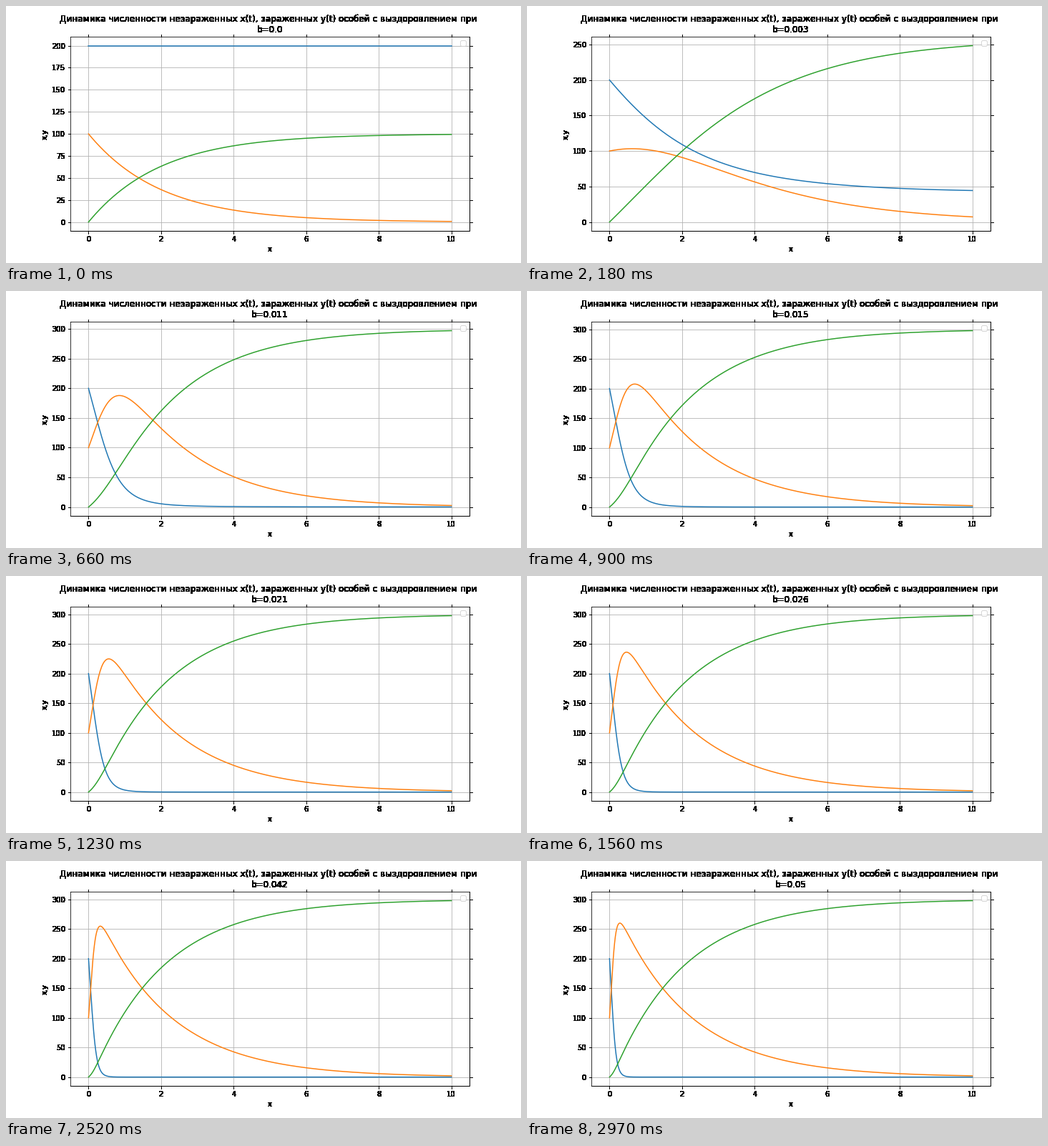
A matplotlib script for the animation above (3000 ms loop, 720 by 360 pixels).

```python
import matplotlib.pyplot as plt
import numpy as np
from matplotlib.animation import FuncAnimation
from matplotlib.artist import Artist, allow_rasterization

FRAMES, INTERVAL = 100, 30
RECOVERY = 0.5
START = (200.0, 100.0, 0.0)  # healthy, infected, recovered
RATES = np.linspace(0, 0.05, FRAMES)
TIME = np.linspace(0, 10, 501)

plt.rcParams["font.family"] = "DejaVu Sans"


def flow(state):
    x, y, _ = state
    caught, healed = RATES * x * y, RECOVERY * y
    return np.array([-caught, caught - healed, healed])


def solve():
    """Integrate the model for all rates at once (RK4)."""
    h = TIME[1] - TIME[0]
    state = np.outer(START, np.ones(FRAMES))
    path = [state]
    for _ in TIME[1:]:
        k1 = flow(state)
        k2 = flow(state + h / 2 * k1)
        k3 = flow(state + h / 2 * k2)
        k4 = flow(state + h * k3)
        state = state + h / 6 * (k1 + 2 * k2 + 2 * k3 + k4)
        path.append(state)
    return np.array(path)


def solid(image, dpi):
    """Turn every touched pixel fully black."""
    ink = np.zeros_like(image)
    ink[..., 3] = image[..., 3] > 0
    return ink, 0, 0


class HardInk(Artist):
    """Redraws labels, ticks and outer spines without soft edges."""

    zorder = 10

    def parts(self):
        ax = self.axes
        yield from (ax.title, ax.xaxis.label, ax.yaxis.label)
        yield from (ax.spines["bottom"], ax.spines["right"])
        for axis in (ax.xaxis, ax.yaxis):
            low, high = axis.get_view_interval()
            for tick in axis.get_major_ticks():
                if low <= tick.get_loc() <= high:
                    yield from (tick.tick1line, tick.tick2line, tick.label1)

    @allow_rasterization
    def draw(self, renderer):
        for part in self.parts():
            part.draw(renderer)


curves = solve()
fig, ax = plt.subplots(figsize=(10, 5), dpi=72, facecolor="white")
fig.subplots_adjust(left=0.125, right=0.9, bottom=0.125, top=0.88)
lines = [ax.plot([], [])[0] for _ in START]
ax.set_xlabel("x")
ax.set_ylabel("x,y")
ax.grid(True)
ax.tick_params(top=True, right=True)
ax.legend([], [], loc="upper right")
ink = HardInk()
ink.set_agg_filter(solid)
ax.add_artist(ink)


def update(i):
    for k, line in enumerate(lines):
        line.set_data(TIME, curves[:, k, i])
    ax.relim()
    ax.autoscale_view()
    ax.set_title(
        "Динамика численности незараженных x(t), зараженных y(t) "
        f"особей с выздоровлением при \nb={round(float(RATES[i]), 3)}"
    )
    return lines


anim = FuncAnimation(fig, update, frames=FRAMES, interval=INTERVAL,
                     repeat=True, repeat_delay=0)
plt.show()
```
